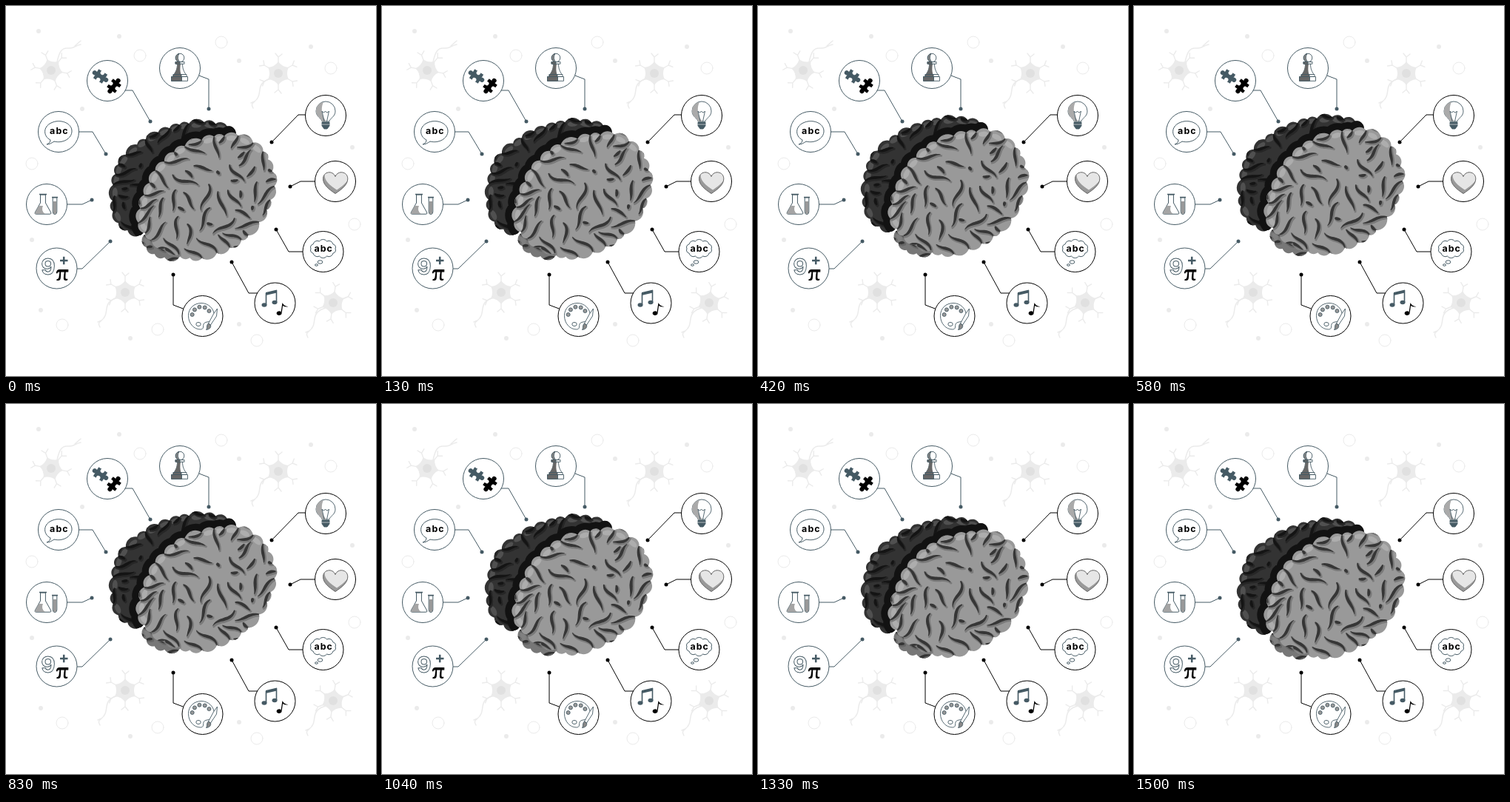
These frames come from a looping animation (500 by 500 pixels, 1.54 s). An HTML page:

```html
<!DOCTYPE html>
<html lang="en">
<head>
<meta charset="utf-8">
<title>Brain functions</title>
<style>
html, body { margin: 0; width: 100%; height: 100%; overflow: hidden; background: #fff; }
svg { display: block; width: 100vw; height: 100vh; }
text { font-family: Inter, Roboto, sans-serif; font-weight: 700; text-anchor: middle; }
.word { font-size: 12.4px; letter-spacing: 1.1px; fill: #000; stroke: none; }
.soft { stroke: #ebebeb; fill: none; stroke-linecap: round; stroke-linejoin: round; }
.icon { stroke: #455a64; stroke-linejoin: round; fill: #fff; }
</style>
</head>
<body>
<svg viewBox="0 0 500 500">
  <g id="backdrop"></g>
  <g id="links"></g>
  <g id="brain"></g>

  <g class="icon">
    <path d="M60 181c-10-5-10-18 1-23 12-6 28 0 28 11 0 10-12 17-24 14-3 2-6 4-10 4 3-1 5-3 5-6z"/>
    <text class="word" x="71.900" y="173.400">abc</text>
  </g>

  <g class="icon">
    <path id="cloud"/>
    <ellipse cx="424.500" cy="346" rx="3.400" ry="2.200"/><ellipse cx="419.500" cy="350" rx="1.900" ry="1.300"/>
    <text class="word" x="429.200" y="332.400">abc</text>
  </g>

  <g class="icon">
    <text x="57" y="363" font-size="30">9</text>
    <path d="M73 344h10.500M78.200 338.700v10.600" stroke-width="2.500"/>
    <text x="76" y="371" font-size="27" style="font-family: 'Noto Serif', serif" fill="#000" stroke="none">π</text>
  </g>

  <g class="icon">
    <path d="M46.500 255v11l-7.300 13q-1 2.200 1.500 2.200h18.500q2.500 0 1.500-2.200l-7.300-13v-11z"/>
    <path d="M44.300 270l-4.900 9q-1 2 1.500 2h12q-6-4-3-11z" fill="#a5a5a5" stroke="none"/>
    <path d="M45 254.500h10M62 258.500h8" stroke-width="1.700"/>
    <path d="M63.200 259v19q0 3.500 2.800 3.500t2.800-3.500v-19z"/>
    <path d="M63.700 264h4.600v14q0 3-2.300 3t-2.300-3z" fill="#999" stroke="none"/>
  </g>

  <g id="puzzle"></g>

  <g class="icon" stroke-width=".9">
    <path d="M231.500 78c0 7-2 11-5 15h17c-3-4-5-8-5-15z"/>
    <path d="M231.500 78c0 7-2 11-5 15h10q-2-7-.500-15z" fill="#666" stroke="none"/>
    <circle cx="235" cy="70" r="5.800"/>
    <path d="M234 64.300a5.800 5.800 0 0 0 1 11.500q-5-5-1-11.500z" fill="#888"/>
    <path d="M229 75.500h12v2.700h-12zM226 92.500h18v3h-18zM223.500 95.500h22v5.800h-22z"/>
    <path d="M229 75.500h6v2.700h-6zM226 92.500h11v3h-11zM223.500 95.500h14v5.800h-14z" fill="#666"/>
  </g>

  <g class="icon" stroke-width=".9">
    <path d="M427 156c0-4-8-6-8-14a13 13 0 0 1 26 0c0 8-8 10-8 14z"/>
    <path d="M427 156c0-4-8-6-8-14 0-7 4-11 10-12-3 5-4 18 4 26z" fill="#aaa" stroke="none"/>
    <path d="M430 156l-3-14q2.500 4 4.500 0 2.500 4 5 0l-3 14" fill="none"/>
    <path d="M427 157h10v5l-3 4h-4l-3-4z" fill="#455a64"/>
    <path d="M426.500 160h11" stroke="#fff" stroke-width=".6"/>
  </g>

  <defs>
    <path id="heart" d="M445 253.500c-9-6-16.500-12-16.500-20 0-10 13-12 16.500-3 3.500-9 16.800-7 16.800 3 0 8-7.800 14-16.800 20z"/>
    <clipPath id="heartClip"><use href="#heart"/></clipPath>
  </defs>
  <use href="#heart" fill="#999"/>
  <g clip-path="url(#heartClip)"><use href="#heart" x="2" y="-5" fill="#e6e6e6"/></g>
  <use href="#heart" fill="none" stroke="#666"/>

  <g fill="#455a64">
    <path d="M351.500 404v-15.500l14-3.500v15.500" fill="none" stroke="#455a64" stroke-width="1.600"/>
    <path d="M351 387l15-3.600v4l-15 3.600z"/>
    <ellipse cx="349" cy="404" rx="3.500" ry="2.800"/><ellipse cx="363" cy="400.500" rx="3.500" ry="2.800"/>
    <path d="M371.300 415l2.200-14q1.500 4 8 5.500-5 .5-7.400-1.500l-1.500 10a3.500 2.800 0 1 1-1.300-2z" fill="#000"/>
  </g>

  <g class="icon" stroke-width=".9">
    <path d="M264 401.500c-10 0-17.500 7-17.500 17 0 11 8 18.500 16 18.500 6 0 3-5 5-8 3-4 14 0 14-10 0-10-8-17.500-17.500-17.500z"/>
    <ellipse cx="260" cy="430" rx="3.200" ry="2.600"/>
    <g id="paints" fill="#999"></g>
    <path d="M285.500 409l-1 10-8 12-3-2 7-13z"/>
    <path d="M273.500 429l3 2c1 4-2 6-6 6.500 2-3 0-6 3-8.500z" fill="#888"/>
  </g>
</svg>
<script>
const $ = id => document.getElementById(id);
const SLATE = '#455a64';
const { sin, cos, PI, hypot, atan2, abs, floor, round } = Math;
const range = n => [...Array(n).keys()];
const points = s => s.split(' ').map(p => p.split(',').map(Number));
const dot = (x, y, r, a = '') => `<circle cx="${x}" cy="${y}" r="${r}" ${a}/>`;

function seeded(seed) {
  return () => (seed = (seed * 16807) % 2147483647) / 2147483647;
}

// Pale dots, rings and neurons
const spots = points('44,34 153,41 103,139 35,316 47,411 168,449 315,430 468,191 412,55 315,74');
const rings = points('181,67 291,49 439,84 35,213 76,431 205,437 339,452 471,295');
const arm = a => `<g transform="rotate(${a})"><path d="M0-14v-8l-4-5m4 5l5-4" stroke-width="1.400"/></g>`;
const body = range(6).map(i => {
  const a = i * PI / 3, b = a + PI / 6;
  return `${i ? 'L' : 'M'}${16 * sin(a)} ${-16 * cos(a)}Q${10 * sin(b)} ${-10 * cos(b)} ${16 * sin(a + PI / 3)} ${-16 * cos(a + PI / 3)}`;
}).join('');
const neuron = (x, y, turn, axon) => `<g class="soft" transform="translate(${x} ${y})">
  <g transform="rotate(${turn})"><path d="${body}" fill="#ebebeb" stroke="none"/>${range(6).map(i => arm(i * 60)).join('')}</g>
  <path d="${axon}" stroke-width="1.500"/>${dot(0, 0, 6, 'fill="#e0e0e0" stroke="none"')}</g>`;
const tail = 'M-10 7c-10 3-14 7-15 15s-2 12-7 16-4 5-2 9m2-9l-5 2';
$('backdrop').innerHTML =
  spots.map(([x, y]) => dot(x, y, 3, 'fill="#ebebeb"')).join('') +
  rings.map(([x, y]) => dot(x, y, 8, 'class="soft"')).join('') +
  neuron(61, 87, -20, 'M8-11C11-26 15-31 23-30s10-4 17-5m-8 2l8-7') +
  neuron(368, 91, 0, tail) + neuron(161, 387, 0, tail) + neuron(442, 401, 8, tail);

// Badge centre, elbow of its connector, end at the brain
const cool = ['137,101 171,114 195,156', '235,84 274,99 274,139', '71,170 117,170 135,200',
  '55,268 103,268 116,262', '68.500,354.500 103,355 141,318'];
const dark = ['432,148 395,147 359,184', '445,237 398,237 384,244', '428.500,332 382,332 365,302',
  '363.500,401.500 328,388 305,346', '265.500,419 226,404 226,363'];
const badge = ink => spec => {
  const [[x, y], [ex, ey], [tx, ty]] = points(spec);
  const startY = ex === tx ? y : ey;
  return `<path d="M${x} ${startY}L${ex} ${ey} ${tx} ${ty}" fill="none" stroke="${ink}"/>` +
    dot(tx, ty, 2.5, `fill="${ink}"`) + dot(x, y, 27.5, `fill="#fff" stroke="${ink}"`);
};
$('links').innerHTML = cool.map(badge(SLATE)).join('') + dark.map(badge('#000')).join('');

// Evenly spread, slightly jittered points around a polygon
function spread(poly, n, rnd) {
  const sides = poly.map((p, i) => {
    const q = poly[(i + 1) % poly.length];
    return { p, q, len: hypot(q[0] - p[0], q[1] - p[1]) };
  });
  const total = sides.reduce((sum, s) => sum + s.len, 0);
  return range(n).map(i => {
    let d = (i + rnd() * .4) / n * total;
    const { p, q, len } = sides.find(s => d < s.len || (d -= s.len, false));
    return [0, 1].map(k => p[k] + (q[k] - p[k]) * d / len);
  });
}

// Closed outline of outward bulges through clockwise points
function bumpy(pts) {
  return pts.reduce((d, [x, y], i) => {
    const [nx, ny] = pts[(i + 1) % pts.length];
    const r = hypot(nx - x, ny - y) * .62;
    return d + `A${r} ${r} 0 0 1 ${nx} ${ny}`;
  }, 'M' + pts[0]) + 'z';
}

$('cloud').setAttribute('d', bumpy(range(10).map(i => [428.5 + 16.5 * cos(i * PI / 5), 328 + 10.5 * sin(i * PI / 5)])));
$('paints').innerHTML = range(5).map(i => dot(264 + 12.5 * cos(3.3 + i * .6), 419 + 12.5 * sin(3.3 + i * .6), 2.5)).join('');

const piece = (x, y, turn, ink) => `<g transform="translate(${x} ${y}) rotate(${turn})" fill="${ink}">
  <rect x="-7" y="-7" width="14" height="14"/>${dot(-9, 0, 3.1)}${dot(9, 0, 3.1)}
  ${dot(0, -5.5, 2.8, 'fill="#fff"')}${dot(0, 5.5, 2.8, 'fill="#fff"')}</g>`;
$('puzzle').innerHTML = piece(127.5, 95, 32, SLATE) + piece(146, 108, -52, '#000');

// Grows winding creases that stop where they meet an earlier one
function creaser(rnd) {
  const taken = [];
  const near = (x, y, gap) => taken.some(([a, b]) => hypot(a - x, b - y) < gap);
  return (x, y, heading, len, width) => {
    if (near(x, y, 9)) return '';
    const bend = (rnd() < .5 ? -1 : 1) * (.1 + rnd() * .1);
    const run = [], steps = round(len / 2);
    for (let i = 0; i <= steps && !near(x, y, 5); i++) {
      run.push([x, y, heading]);
      heading += bend * cos(i / steps * 2.8);
      x += 2 * cos(heading);
      y += 2 * sin(heading);
    }
    taken.push(...run);
    if (run.length < 4) return '';
    const side = k => run.map(([px, py, h], i) => {
      const w = k * width * sin(PI * (.12 + .88 * i / run.length)) / 2;
      return `${(px - w * sin(h)).toFixed(1)} ${(py + w * cos(h)).toFixed(1)}`;
    });
    return 'M' + [...side(1), ...side(-1).reverse()].join('L') + 'z';
  };
}

function lobe(id, key, bumps, seed, { fill, ink, shade, glow }) {
  const rnd = seeded(seed), poly = points(key), rim = spread(poly, bumps, rnd);
  const mid = [0, 1].map(k => poly.reduce((sum, p) => sum + p[k], 0) / poly.length);
  const outline = bumpy(rim), crease = creaser(rnd);
  let folds = '', lights = '';
  rim.forEach(([x, y], i) => {
    const [nx, ny] = rim[(i + 1) % bumps];
    const inward = atan2(mid[1] - y, mid[0] - x);
    folds += crease(x, y, inward + (rnd() - .5) * 1.2, 20 + rnd() * 16, 4);
    if (nx - x > (ny - y) * .9) {
      const turn = atan2(ny - y, nx - x);
      const lx = (x + nx) / 2 - 3 * sin(turn), ly = (y + ny) / 2 + 3 * cos(turn);
      lights += `<ellipse rx="7" ry="3.500" transform="translate(${lx} ${ly}) rotate(${turn * 180 / PI})"/>`;
    }
  });
  for (let y = 160; y < 345; y += 12)
    for (let x = 140; x < 366; x += 12)
      folds += crease(x + rnd() * 9, y + rnd() * 9, rnd() * 2 * PI, 26 + rnd() * 16, 4.2);
  return { outline, art: `<clipPath id="${id}"><path d="${outline}"/></clipPath>
    <path d="${outline}" fill="${fill}"/><g clip-path="url(#${id})"><g fill="${glow}">${lights}</g>
    <path d="${folds}" transform="translate(1.200 1.500)" fill="${shade}" stroke="${shade}" stroke-width="2"/>
    <path d="${folds}" fill="${ink}"/></g>` };
}

const rear = lobe('rear', '180,310 155,299 145,281 143,250 150,216 168,193 202,172 236,160 268,157 298,162 312,174 250,220 200,280', 30, 77,
  { fill: '#333', ink: '#141414', shade: '#262626', glow: '#505050' });
const under = lobe('under', '186,310 230,318 236,341 206,339 190,327', 8, 31,
  { fill: '#777', ink: '#333', shade: '#666', glow: '#808080' });
const front = lobe('front', '179,293 183,264 202,222 232,193 276,177 314,175 343,189 358,214 363,246 350,281 330,308 298,329 257,343 222,332 192,313', 30, 2024,
  { fill: '#999', ink: '#363636', shade: '#7a7a7a', glow: '#adadad' });
$('brain').innerHTML = rear.art +
  `<path d="${front.outline}" clip-path="url(#rear)" fill="none" stroke="#121212" stroke-width="18"/>` +
  under.art + front.art;

// Steady rise and fall, held for each of 37 steps; the top comes at 695 ms
const LOOP = 1540, STEPS = 37, RISE = 10, TOP = 695;
function frame(now) {
  const t = floor(now % LOOP / LOOP * STEPS) / STEPS;
  const swing = (t - TOP / LOOP + 1.5) % 1 - .5;
  $('brain').setAttribute('transform', `translate(0 ${1 - RISE * (1 - 2 * abs(swing))})`);
  requestAnimationFrame(frame);
}
frame(performance.now());
</script>
</body>
</html>
```
